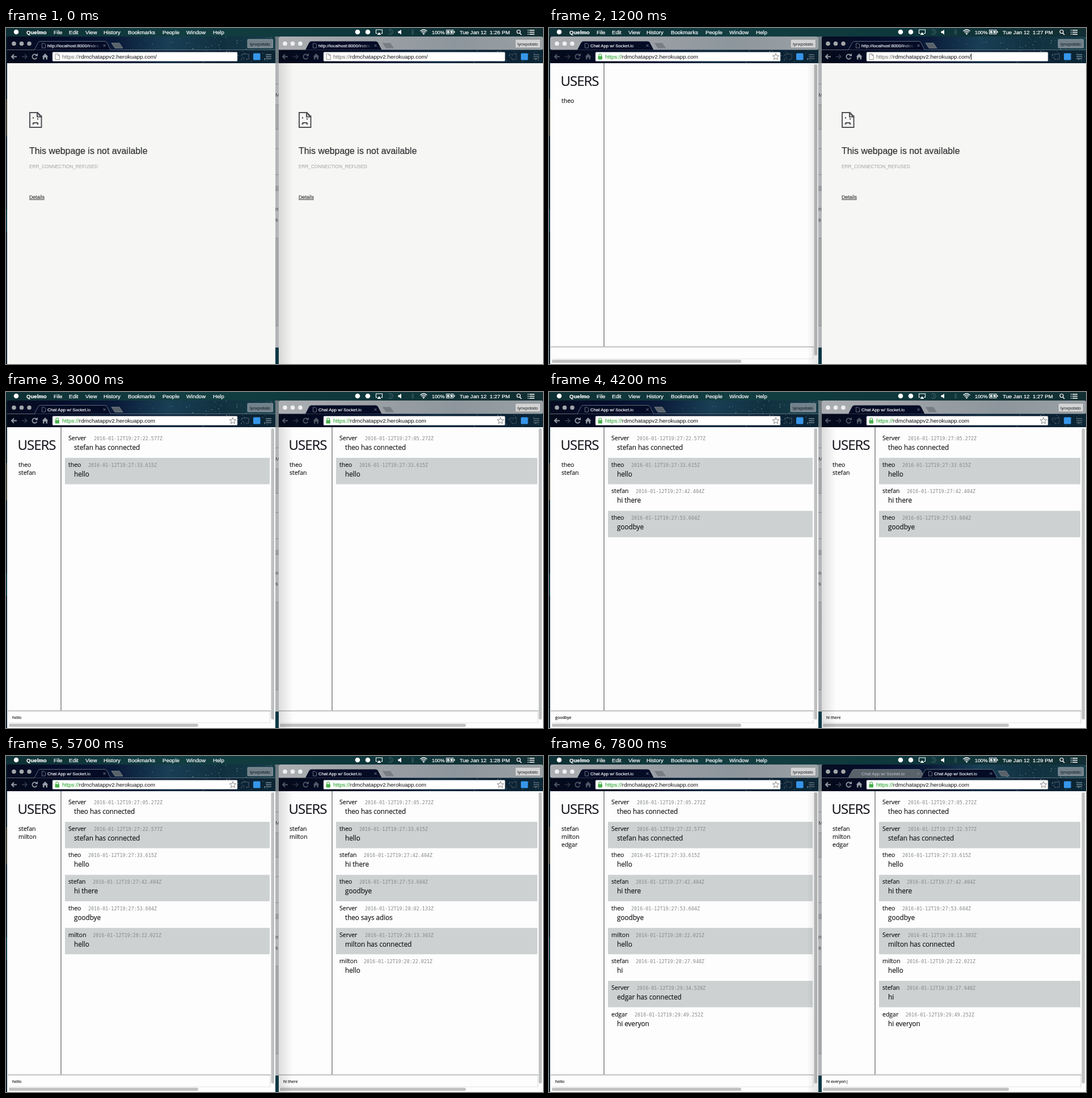
These frames come from a looping animation (947 by 592 pixels, 8 s). An HTML page:

```html
<!DOCTYPE html>
<html lang="en">
<head>
<meta charset="utf-8">
<title>Two chat windows</title>
<style>
  html, body { margin: 0; width: 100%; height: 100%; overflow: hidden; background: #0b2530; }
  svg { display: block; width: 947px; height: 592px; font-family: "Liberation Sans", Arial, sans-serif; }
  text { white-space: pre; }
  .chat { font-family: "Open Sans", "Noto Sans", sans-serif; stroke: #111; stroke-width: .15px; }
  .stamp { font-family: "DejaVu Sans Mono", monospace; }
  .menu { fill: #fff; stroke: #fff; stroke-width: .22px; }
  .firm { stroke: #303234; stroke-width: .2px; }
</style>
</head>
<body>
<svg id="stage" viewBox="0 0 947 592"></svg>
<script>
const STEP = 300, LOOP = 8000;
const HOST = 'rdmchatappv2.herokuapp.com';

const messages = [
  ['Server', '27:05.272', 'theo has connected'],
  ['Server', '27:22.577', 'stefan has connected'],
  ['theo', '27:33.615', 'hello'],
  ['stefan', '27:42.404', 'hi there'],
  ['theo', '27:53.604', 'goodbye'],
  ['Server', '28:02.133', 'theo says adios'],
  ['Server', '28:13.303', 'milton has connected'],
  ['milton', '28:22.021', 'hello'],
  ['stefan', '28:27.948', 'hi'],
  ['Server', '29:34.520', 'edgar has connected'],
  ['edgar', '29:49.252', 'hi everyon'],
];
const stampX = { Server: 155, theo: 145, stefan: 153, milton: 153, edgar: 151 };

// Each step changes part of the state. left/right: message digits, null = failed page.
const steps = [
  { clock: '1:26', active: 0, left: null, right: null, users: '', leftInput: '', rightInput: '', dialog: null, tabs: 1, caret: false },
  {},
  { left: '', dialog: '' },
  { clock: '1:27', dialog: 'theo' },
  { active: 1, users: 'theo', dialog: null, caret: true },
  { right: '', dialog: '', caret: false },
  { dialog: 'stef' },
  { dialog: 'stefan' },
  { dialog: null, left: '1', right: '0', users: 'theo stefan' },
  { active: 0, leftInput: 'hello' },
  { left: '12', right: '02' },
  { active: 1, rightInput: 'hi the' },
  { left: '123', right: '023', rightInput: 'hi there' },
  { active: 0, leftInput: 'goodb' },
  { left: '1234', right: '0234', leftInput: 'goodbye' },
  {},
  { clock: '1:28', left: '', right: '02345', users: 'stefan', leftInput: '', dialog: '' },
  { dialog: 'milton' },
  { dialog: null, left: '01234', right: '023456', users: 'stefan milton' },
  { left: '012347', right: '0234567', leftInput: 'hello' },
  { active: 1, rightInput: 'hi' },
  { left: '0123478', right: '02345678' },
  { clock: '1:29', right: '', rightInput: '', tabs: 2, dialog: '' },
  { dialog: 'edgar' },
  { dialog: null, left: '01234789', right: '01234678', users: 'stefan milton edgar' },
  { rightInput: 'hi eve|' },
  { left: '01234789a', right: '01234678a', rightInput: 'hi everyon|' },
];

const rect = (x, y, w, h, fill, more = '') =>
  `<rect x="${x}" y="${y}" width="${w}" height="${h}" fill="${fill}" ${more}/>`;
const text = (x, y, s, size, fill = '#111', more = '') =>
  `<text x="${x}" y="${y}" font-size="${size}" fill="${fill}" ${more}>${s}</text>`;
const path = (d, fill, more = '') => `<path d="${d}" fill="${fill}" ${more}/>`;
const line = (d, color, width = 1) => path(d, 'none', `stroke="${color}" stroke-width="${width}"`);
const dot = (x, y, r, fill) => `<circle cx="${x}" cy="${y}" r="${r}" fill="${fill}"/>`;
const grad = (id, colors, vertical, more = '') =>
  `<linearGradient id="${id}" ${vertical ? 'x2="0" y2="1"' : ''} ${more}>` +
  colors.map((c, i) => `<stop offset="${i / (colors.length - 1)}" stop-color="${c}"/>`).join('') +
  '</linearGradient>';

const defs = '<defs>' +
  grad('bar', ['#0e3034', '#123e42', '#0e373b', '#122e32']) +
  grad('sky', ['#060c20', '#050d2b', '#0a1a38', '#193f55', '#10303f', '#173e49']) +
  grad('dusk', ['#040a1a', '#030a24', '#071530', '#0f2b40', '#0a2034', '#0c2635']) +
  grad('haze', ['#b9bbbd', '#a7abae', '#969da2', '#a3a9ad']) +
  grad('title', ['#fff', '#fff', 'rgba(255,255,255,0)'], false, 'gradientUnits="userSpaceOnUse" x1="115" x2="168"') +
  grad('shadeR', ['rgba(0,0,0,.13)', 'rgba(0,0,0,0)']) +
  grad('shadeL', ['rgba(0,0,0,0)', 'rgba(0,0,0,.1)']) +
  grad('head', ['#e6e5df', '#cfcec8'], true) +
  grad('ok', ['#a4a4a4', '#858585'], true) +
  '</defs>';

let seed = 7;
const random = () => (seed = seed * 16807 % 2147483647) / 2147483647;
const stars = Array.from({ length: 110 }, () => {
  const x = 190 + 283 * Math.sqrt(random()), y = 16 + 45 * random();
  return dot(x.toFixed(1), y.toFixed(1), (.25 + .4 * random()).toFixed(2), '#a5c6d0');
}).join('');

function menuBar(clock) {
  const items = [[84, 'File'], [111, 'Edit'], [140, 'View'], [172, 'History'], [215, 'Bookmarks'],
    [276, 'People'], [318, 'Window'], [365, 'Help']];
  const label = (x, s, more = '') => text(x, 10.5, s, 9.6, '#fff', 'class="menu" ' + more);
  return rect(0, 0, 947, 15, 'url(#bar)') +
    dot(18, 7, 4.3, '#fff') +
    label(36, 'Quelmo', 'font-weight="bold"') +
    items.map(([x, s]) => label(x, s)).join('') +
    dot(620, 7, 4.3, '#fff') + dot(638, 7, 4.3, '#fff') +
    line('M655 9.5H652.5V3H663.5V9.5H661', '#fff', 1.1) + path('M654.5 12L658 7.5 661.5 12Z', '#fff') +
    line('M674 4.5A4.5 4.5 0 1 1 674 9.5M678 4V7.5L680 9', '#4c6c6e') +
    path('M691.5 5.5H693.5L697 3V11.5L693.5 9H691.5Z', '#fff') +
    line('M714.5 5L719.5 9.5 717 12V2.5L719.5 5 714.5 9.5', '#3f6062', .9) +
    line('M730.5 5.5Q736.5 0 742.5 5.5M732.5 7.5Q736.5 3.8 740.5 7.5M734.5 9.5Q736.5 7.5 738.5 9.5', '#fff', 1.3) +
    dot(736.5, 11, 1, '#fff') +
    label(751, '100%', 'style="font-size:8.8px"') +
    line('M776.5 3.5H789V10.5H776.5Z', '#fff') + rect(778, 5, 9.5, 4, '#fff') + rect(790, 5.5, 1.5, 3, '#fff') +
    line('M784 3.5L781.5 7H784L782 10.5', '#123e42', 1.2) +
    label(800, `Tue Jan 12  ${clock} PM`) +
    '<circle cx="904" cy="6.5" r="3" fill="none" stroke="#fff" stroke-width="1.2"/>' + line('M906 9L909 12', '#fff', 1.4) +
    line('M923 4H932M923 7.5H932M923 11H932M920 4H921.5M920 7.5H921.5M920 11H921.5', '#fff', 1.4);
}

function desktop() {
  const texts = [[121, 'M'], [322, 'n’s'], [341, 's']];
  return rect(0, 15, 947, 577, '#08202c') +
    rect(0, 125, 3, 66, '#3a3a2e') + rect(0, 320, 3, 40, '#0d3a4b') +
    rect(474, 15, 8, 548, '#b3b5b8') + rect(474, 15, 8, 47, '#6e7a80') +
    rect(474, 135, 8, 43, '#a5a7a9') + rect(474, 278, 8, 8, '#9b9da0') + rect(474, 370, 8, 154, '#a5a7a9') +
    [98, 135, 178, 212, 258, 286, 370, 524].map(y => rect(474, y, 8, 1, '#8b8e91')).join('') +
    texts.map(([y, s]) => text(475, y, s, 9.5, '#444')).join('') +
    rect(474, 563, 8, 29, '#0c3744');
}

function tab(x, front, active, title) {
  const shape = 'M50 38.5L56.5 26Q57.5 23.5 60.5 23.5H174Q177 23.5 178 26L184.5 38.5';
  const ink = front ? 'url(#title)' : '#c0c5ca';
  return `<g transform="translate(${x})">` +
    path(shape, front ? '#040b25' : '#5a626a', active ? 'stroke="#75828f" stroke-width=".8"' : '') +
    (front ? line('M63.5 27H67.5L69.5 29V35H63.5Z', '#9097a3', .7) : '') +
    text(73, 33.8, title, 7.8, ink, front ? `stroke="${ink}" stroke-width=".15"` : '') +
    line('M171.5 29L175.5 33M175.5 29L171.5 33', '#858c98', .9) + '</g>';
}

function toolbar(active, loaded, d, tabs, caret) {
  const icon = active ? '#959ca5' : '#4f5866', dim = active ? '#36404f' : '#2b3442';
  const title = loaded ? 'Chat App w/ Socket.io' : 'http://localhost:8000/Index.h';
  const shift = 128 * (tabs - 1);
  let s = rect(2, 15, 473 + d, 47, 'url(#sky)', 'rx="3"') + rect(2, 38, 473 + d, 24, 'url(#dusk)') + stars;
  if (active) s += rect(2, 38, 473 + d, .8, '#75828f');
  else s += rect(2, 15, 473 + d, 23.5, 'url(#haze)', 'rx="3" opacity=".93"');
  s += [14, 27.5, 41].map(x => dot(x, 27.5, 3.8, active ? '#a2a5a8' : '#f0f0f0')).join('');
  if (tabs > 1) s += tab(0, false, active, title);
  s += tab(shift, true, active, title) +
    path(`M${186 + shift} 26.5H${200 + shift}L${206 + shift} 35.5H${192 + shift}Z`, active ? '#59626a' : '#777d82',
      'stroke="#848b91" stroke-width=".7"');
  s += rect(426 + d, 20, 44.5, 15, active ? '#71808a' : '#d2d3d4', `rx="1" stroke="${active ? '#9ba7ad' : '#858585'}" stroke-width=".8"`) +
    text(430 + d, 30.6, 'lynxpotato', 7.9, active ? '#10181f' : '#222');

  s += line('M19 50.5H10M14 46.5L10 50.5 14 54.5', icon, 2) +
    line('M28 50.5H37M33 46.5L37 50.5 33 54.5', dim, 1.6) +
    line('M53.5 47.5A4.2 4.2 0 1 0 54.5 52', icon, 1.8) + path('M51 49.5H56V44.5Z', icon) +
    path('M63.5 50.5L69 45 74.5 50.5H73V55.5H70.5V52H67.5V55.5H65V50.5Z', icon);

  s += rect(82, 42.5, 326 + d, 16, '#fff', 'rx="1.5" stroke="#8e959e" stroke-width=".7"');
  if (loaded) {
    s += rect(86.5, 49.5, 7.5, 6, '#49b14c', 'rx="1"') + line('M88 50V48A2.2 2.2 0 0 1 92.5 48V50', '#49b14c', 1.2) +
      line([...Array(11).keys()].map(i => {
        const r = i % 2 ? 2.6 : 6, a = Math.PI * (i / 5 - .5);
        return (i ? 'L' : 'M') + (400 + d + r * Math.cos(a)).toFixed(1) + ' ' + (50.8 + r * Math.sin(a)).toFixed(1);
      }).join(''), '#777', .9);
  } else {
    s += line('M87 45.5H91.5L94.5 48.5V55.5H87ZM91.5 45.5V48.5H94.5', '#888', .9);
  }
  s += text(99, 54, `<tspan fill="${loaded ? '#179a1d' : '#666'}">https://</tspan>${HOST}${loaded ? '' : '/'}`, 9.95);
  if (caret) s += rect(266, 45, 1, 11, '#111');

  return s + line(`M${416 + d} 49V46H${428 + d}V55H${423 + d}M${416 + d} 51.5A4 4 0 0 1 ${420 + d} 55.5`, active ? '#4e6170' : '#3d4c5a', 1) +
    rect(436 + d, 44.5, 12.5, 12, '#3796ea', 'rx="1.5"') +
    line(`M${458 + d} 47H${468 + d}M${458 + d} 50.5H${468 + d}M${458 + d} 54H${468 + d}`, active ? '#728591' : '#5c6975', 1.4);
}

function failedPage(d) {
  const x = 41 + d / 2;
  return rect(2, 62, 473 + d, 530, '#f6f7f4') +
    `<g transform="translate(${x} 148)">` +
    line('M1 1H15V3H17V5H19V7H21.5V27H1ZM14 1V8.5H21.5', '#505155', 2) +
    rect(6, 9, 2, 2.5, '#505155') + rect(14, 11, 2, 2.5, '#505155') +
    line('M5.5 21H7.5V19H14.5V21H16.5', '#505155', 2) + '</g>' +
    text(x, 222.3, 'This webpage is not available', 15.9, '#303234', 'class="firm"') +
    text(x, 247, 'ERR_CONNECTION_REFUSED', 8.22, '#a3a5a3') +
    text(x, 301, 'Details', 8.8, '#404244', 'class="firm" text-decoration="underline"');
}

function chatPage(list, users, input, d) {
  const rows = [...list].map((c, i) => {
    const [who, time, body] = messages[parseInt(c, 16)], y = 46.7 * i;
    return (i % 2 ? rect(104, 69.3 + y, 361 + d, 46.5, '#cdd1d2') : '') +
      text(110, 85 + y, who, 10.5, '#111', 'class="chat"') +
      text(stampX[who], 85 + y, `2016-01-12T19:${time}Z`, 8.38, '#858889', 'class="stamp"') +
      text(120, 102 + y, body, 11.7, '#111', 'class="chat"');
  }).join('');
  return rect(2, 62, 473 + d, 530, '#fdfdfd') +
    text(20.5, 102, 'USERS', 24, '#15131c', 'class="chat" letter-spacing="-1"') +
    users.split(' ').map((u, i) => text(22, 132 + 13.8 * i, u, 10.5, '#111', 'class="chat"')).join('') +
    rect(96.4, 62, 1.2, 499, '#626365') + rows +
    rect(3, 561, 464 + d, 1.6, '#b4b6b7') + rect(465.5 + d, 562, .8, 21, '#d0d0d0') + rect(3, 582.5, 464 + d, .8, '#dcdcdc') +
    text(11, 576, input, 7.1, '#111', 'class="chat"') +
    rect(467.5 + d, 64, 5.5, 513, '#bfc0c1', 'rx="2.7"') +
    rect(5, 584.5, 334 + d, 5.5, '#bfc0c1', 'rx="2.7"');
}

function browser(s, side) {
  const d = side ? -6 : 0, list = side ? s.right : s.left, active = s.active === side;
  const page = list === null ? failedPage(d)
    : chatPage(list, s.users, side ? s.rightInput : s.leftInput, d);
  const shade = active ? '' : side ? rect(2, 62, 26, 530, 'url(#shadeR)') : rect(455, 62, 20, 530, 'url(#shadeL)');
  return `<g transform="translate(${478 * side})">` +
    `<clipPath id="win${side}">${rect(2 + side, 15, 473 + d, 580, '#000', 'rx="3"')}</clipPath>` +
    `<g clip-path="url(#win${side})">` +
    toolbar(active, list !== null, d, side ? s.tabs : 1, side && s.caret) + page + shade + '</g></g>';
}

function dialogBox(value) {
  return '<g style="filter:drop-shadow(0 9px 13px rgba(0,0,0,.6)) drop-shadow(0 0 3px rgba(0,0,0,.25))">' +
    rect(325, 127, 299, 127.5, '#ecebe3', 'rx="3"') + '</g>' +
    rect(325, 127, 299, 15, 'url(#head)', 'rx="3"') + rect(325, 141.5, 299, .8, '#b5b4ae') +
    dot(361.5, 174, 18.7, '#d94438') +
    text(394.5, 161.8, `The page at ${HOST} says:`, 9, '#111', 'font-weight="bold"') +
    text(394.5, 176.5, 'Enter username:', 7.57) +
    rect(395.5, 188, 8.5, 8.5, '#fff', 'rx="1.5" stroke="#b3b3ae" stroke-width=".8"') +
    text(407, 195.3, 'Prevent this page from creating additional dialogs.', 9.15) +
    rect(393.5, 202.5, 198, 14, '#fff', 'stroke="#a3a39e" stroke-width="2"') +
    text(397, 212.5, value, 8.4) +
    rect(495, 228.5, 55, 13.5, '#fff', 'rx="2.5" stroke="#c4c3bd" stroke-width=".8"') +
    text(522, 238.3, 'Cancel', 9.1, '#111', 'text-anchor="middle"') +
    rect(559, 228.5, 52, 13.5, 'url(#ok)', 'rx="2.5"') +
    text(584.5, 238.3, 'OK', 9.1, '#fff', 'text-anchor="middle"');
}

const stage = document.getElementById('stage');
const states = steps.map((_, i) => Object.assign({}, ...steps.slice(0, i + 1)));
let shown = -1;

function draw() {
  const i = Math.min(states.length - 1, Math.floor(performance.now() % LOOP / STEP));
  if (i !== shown) {
    const s = states[shown = i];
    stage.innerHTML = defs + desktop() + browser(s, 0) + browser(s, 1) + menuBar(s.clock) +
      (s.dialog === null ? '' : dialogBox(s.dialog));
  }
  requestAnimationFrame(draw);
}
draw();
</script>
</body>
</html>
```
